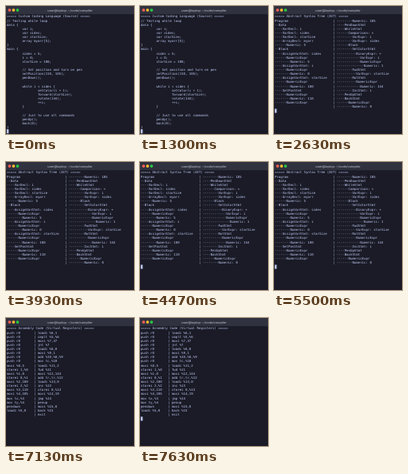
Animation of 161 by 160 pixels, one loop 8 s. Source, as an HTML page:

```html
<!DOCTYPE html>
<html lang="en">
<head>
<meta charset="utf-8">
<title>Compiler stages</title>
<style>
  html, body { margin: 0; width: 100%; height: 100%; overflow: hidden; background: #1a1b26; }
  svg { display: block; width: 100vw; height: 100vh; }
  text { font-family: "DejaVu Sans Mono", monospace; font-size: 40.5px; fill: #c0caf5;
         white-space: pre; text-rendering: geometricPrecision; }
  .title { font-family: Inter, sans-serif; font-weight: 600; font-size: 38px;
           fill: #a4a7b5; text-anchor: middle; }
  .page, .cursor { animation: 8s step-end infinite; }
  #source { animation-name: source; }
  #tree { animation-name: tree; }
  #asm { animation-name: asm; }
  .cursor { fill: #c0caf5; animation-name: blink; }
  @keyframes source { 0% { opacity: 1 } 32.875%, 100% { opacity: 0 } }
  @keyframes tree { 0% { opacity: 0 } 32.875% { opacity: 1 } 70.375%, 100% { opacity: 0 } }
  @keyframes asm { 0% { opacity: 0 } 70.375%, 100% { opacity: 1 } }
  @keyframes blink {
    0%, 16.25%, 29.625%, 55.875%, 68.75%, 95.375% { opacity: 1 }
    9.625%, 22.875%, 49.125%, 62.5%, 89.125% { opacity: 0 }
    100% { opacity: 1 }
  }
</style>
</head>
<body>
<svg viewBox="0 0 1610 1600" preserveAspectRatio="none">
  <rect width="1610" height="1600" fill="#1a1b26"/>
  <rect width="1610" height="102" fill="#30323f"/>
  <circle cx="45" cy="51" r="19" fill="#ff5f57"/>
  <circle cx="95" cy="51" r="19" fill="#febc2e"/>
  <circle cx="145" cy="51" r="19" fill="#28c840"/>
  <text class="title" x="805" y="65">user@laptop: ~/code/compiler</text>
  <g class="page" id="source"></g>
  <g class="page" id="tree"></g>
  <g class="page" id="asm"></g>
</svg>
<script>
const NS = "http://www.w3.org/2000/svg";
const LEFT = 9, TOP = 105, ROW = 51.3, CELL = 24.4;

function add(parent, tag, attrs, content = "") {
  const el = document.createElementNS(NS, tag);
  for (const key in attrs) el.setAttribute(key, attrs[key]);
  el.textContent = content;
  parent.append(el);
}

// Prints the lines and leaves the cursor on the row below them.
function print(id, lines) {
  const page = document.getElementById(id);
  lines.forEach((line, i) => {
    if (line) add(page, "text", { x: LEFT, y: TOP + i * ROW + 39 }, line.replace(/ /g, "\u00a0"));
  });
  add(page, "rect", { class: "cursor", x: LEFT, y: TOP + lines.length * ROW, width: CELL, height: ROW });
}

// Sets two lists side by side with a bar between them.
function columns(left, right, width) {
  return right.map((cell, i) => (left[i] || "").padEnd(width) + "| " + cell);
}

// Each node is written as its depth followed by its label.
const nodes = list => list.trim().split(/\s*\n\s*/)
  .map(s => "--".repeat(+s[0]) + s.slice(1).trim());
const rows = list => list.trim().split(/\s*\n\s*/);

print("source", `===== Custom Coding Language (Source) =====
// Testing while loop
data {
        var i;
        var sides;
        var starSize;
        array myarr[5];
}
main {
        sides = 5;
        i = 0;
        starSize = 100;

        // Set position and turn on pen
        setPosition(110, 105);
        penDown();

        while i < sides {
                setColor(i + 1);
                forward(starSize);
                rotate(144);
                ++i;
        }

        // Just to use all commands
        penUp();
        back(0);
}`.split("\n"));

print("tree", ["===== Abstract Syntax Tree (AST) =====", ...columns(nodes(`
  0 Program
  1 Data
  2 VarDecl: i
  2 VarDecl: sides
  2 VarDecl: starSize
  2 ArrayDecl: myarr
  3 Numeric: 5
  1 Block
  2 AssignVarStmt: sides
  3 NumericExpr
  4 Numeric: 5
  2 AssignVarStmt: i
  3 NumericExpr
  4 Numeric: 0
  2 AssignVarStmt: starSize
  3 NumericExpr
  4 Numeric: 100
  2 SetPosStmt
  3 NumericExpr
  4 Numeric: 110
  3 NumericExpr`), nodes(`
  4 Numeric: 105
  2 PenDownStmt
  2 WhileStmt
  3 Comparison: <
  4 VarExpr: i
  4 VarExpr: sides
  3 Block
  4 SetColorStmt
  5 BinaryExpr: +
  6 VarExpr: i
  6 NumericExpr
  7 Numeric: 1
  4 FwdStmt
  5 VarExpr: starSize
  4 RotStmt
  5 NumericExpr
  6 Numeric: 144
  4 IncStmt: i
  2 PenUpStmt
  2 BackStmt
  3 NumericExpr
  4 Numeric: 0`), 30)]);

print("asm", ["===== Assembly Code (Virtual Registers) =====", ...columns([
  ...Array(8).fill("push r0"), ...rows(`
  movi %0,5
  storei 1,%0
  movi %1,0
  storei 0,%1
  movi %2,100
  storei 2,%2
  movi %3,110
  movi %4,105
  mov tx,%3
  mov ty,%4
  pendown
  loadi %5,0`)], rows(`
  loadi %6,1
  cmplt %5,%6
  movi %7,37
  jnt %7
  loadi %8,0
  movi %9,1
  add %10,%8,%9
  mov tc,%10
  loadi %11,2
  fwd %11
  movi %12,144
  add tr,tr,%12
  loadi %13,0
  inc %13
  storei 0,%13
  movi %14,19
  jmp %14
  penup
  movi %15,0
  back %15
  exit`), 14)]);
</script>
</body>
</html>
```
